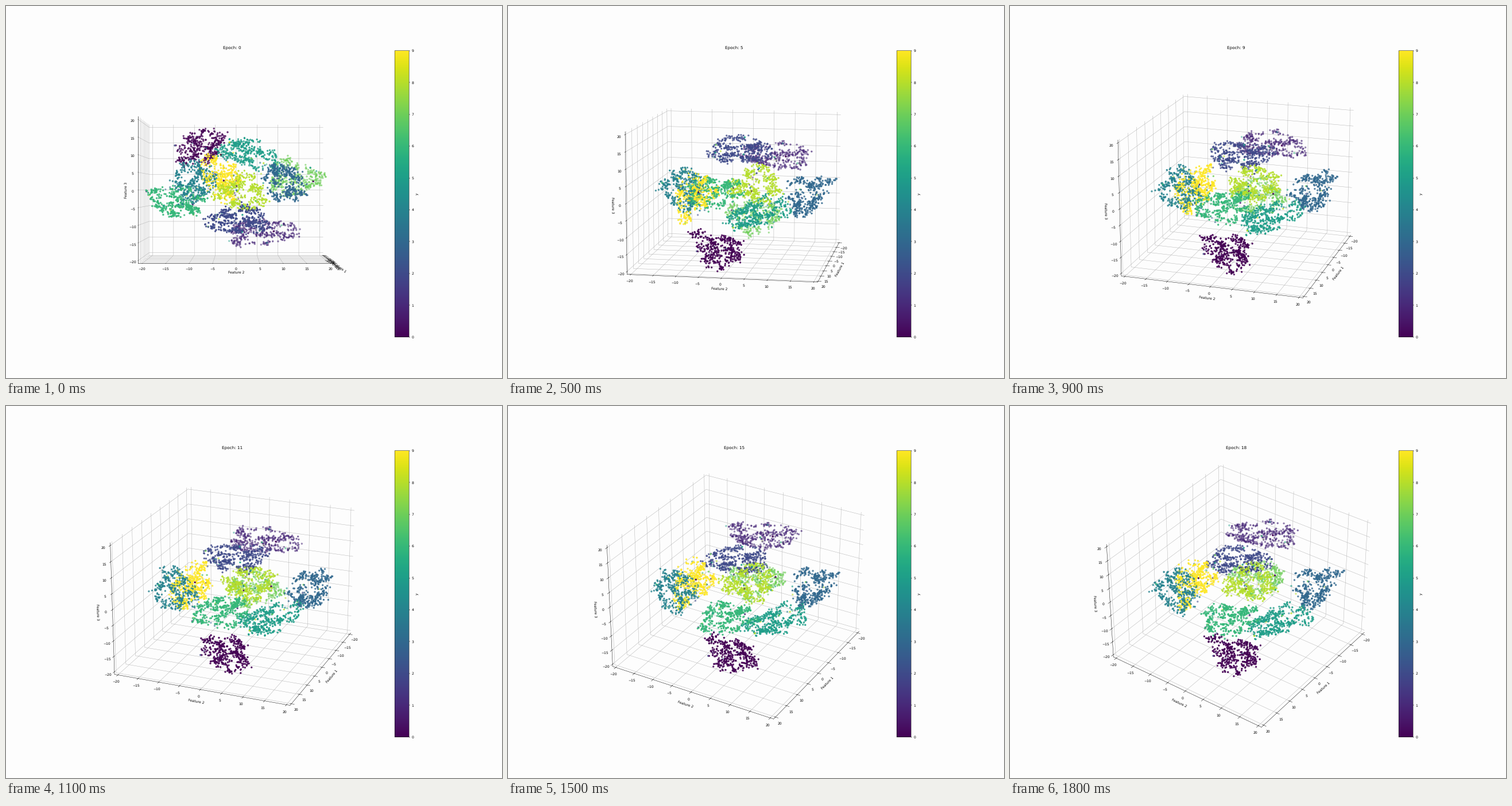
These frames come from a looping animation (864 px wide and 648 px high, 1900 ms). A matplotlib script:

```python
import numpy as np
import matplotlib.pyplot as plt
from matplotlib.animation import FuncAnimation
from matplotlib.cm import ScalarMappable
from matplotlib.colors import Normalize

# Unsnapped lines and unhinted text look as if scaled down smoothly
plt.rcParams.update({"path.snap": False, "text.hinting": "none"})

EPOCHS = 19
CLASSES = 10
PER_CLASS = 390
CLUMPS = 60
LIMIT = 20 * 25 / 24
PAPER = "#fdfdfd"

# Camera of the 3D axes: stage centre, focal length in pixels, distance
CENTRE = (401.0, 320.5)
FOCAL = 2697
DIST = 10
BOX_TO_DATA = np.array([35, 35, 46.67])

# Cluster centres on the stage: first epoch, around the flip, last epoch
START = np.array([(333, 247), (444, 395), (403, 374), (483, 308), (325, 307),
                  (426, 260), (298, 340), (502, 300), (408, 325), (372, 297)])
MIDDLE = np.array([(360, 424), (466, 260), (403, 250), (520, 328), (302, 318),
                   (438, 358), (358, 325), (430, 366), (430, 312), (324, 332)])
END = np.array([(385, 432), (440, 223), (398, 268), (530, 314), (288, 320),
                (472, 372), (383, 372), (432, 300), (417, 308), (320, 308)])
WIDTH = np.array([43, 58, 55, 41, 38, 52, 48, 44, 43, 36])
LEAN = np.array([.2, .1, 0, -.3, .2, -.2, -.1, 0, 0, -.4])
AREA = 1350
MIRROR_Y = 325
FAR_CLASSES = (1, 7)

rng = np.random.default_rng(7)
total = CLASSES * PER_CLASS
label = np.repeat(np.arange(CLASSES), PER_CLASS)
stray = rng.random(total) < 0.028
home = np.where(stray, rng.integers(0, CLASSES, total), label)

# Each cluster is a disc of small clumps
clump = rng.integers(0, CLUMPS, total) + CLUMPS * label
clump_radius = np.sqrt(rng.random(CLASSES * CLUMPS))[clump]
clump_angle = rng.uniform(0, 2 * np.pi, CLASSES * CLUMPS)[clump]
disc = clump_radius * np.exp(1j * clump_angle)
disc += rng.normal(0, 0.09, total) + 1j * rng.normal(0, 0.09, total)

thick = rng.uniform(-0.12, 0.12, total)
stray_depth = rng.uniform(-0.5, 0.35, total)


def view_angle(epoch):
    """Elevation and azimuth share one value in degrees."""
    return 2 * epoch


def unproject(px, py, depth, degrees):
    """Turn stage pixels and depth toward the viewer into data coordinates."""
    s, c = np.sin(np.radians(degrees)), np.cos(np.radians(degrees))
    right = np.array([-s, c, 0])
    up = np.array([-s * c, -s * s, c])
    toward = np.array([c * c, c * s, s])
    scale = (DIST - depth) / FOCAL
    u = (px - CENTRE[0]) * scale
    v = (CENTRE[1] - py) * scale
    pos = np.outer(u, right) + np.outer(v, up) + np.outer(depth, toward)
    return pos * BOX_TO_DATA


def mirror(centres):
    return np.column_stack([centres[:, 0], 2 * MIRROR_Y - centres[:, 1]])


def centres_at(epoch):
    """Drift before and after the embedding turns upside down."""
    if epoch < 4:
        t = min(epoch / 2, 1)
        return START + t * (mirror(MIDDLE) - START), -1
    s = np.clip((epoch - 5) / (EPOCHS - 6), 0, 1)
    t = 1 - (1 - s) ** 2
    return MIDDLE + t * (END - MIDDLE), 1


def points_at(epoch):
    centres, side = centres_at(epoch)
    x, y = centres[home].T
    width = WIDTH[home]
    outline = 1 + 0.12 * np.sin(3 * np.angle(disc) + 2 * home + epoch / 2)
    dx = width * disc.real * outline
    dy = AREA / width * disc.imag * outline + LEAN[home] * dx
    # Seen from above, whatever is lower on the stage is nearer.
    near = 0.2 + 0.001 * (y - MIRROR_Y)
    depth = np.where(np.isin(home, FAR_CLASSES), -0.15, near) + thick
    depth = np.where(stray, stray_depth, depth)
    return unproject(x + dx, y + side * dy, depth, view_angle(epoch))


fig = plt.figure(figsize=(20, 15), dpi=43.2, facecolor=PAPER)
ax = fig.add_subplot(projection="3d", facecolor=PAPER)
ax.set_xlabel("Feature 1")
ax.set_ylabel("Feature 2")
ax.set_zlabel("Feature 3")
bounds = (-LIMIT, LIMIT)
ax.set(xlim=bounds, ylim=bounds, zlim=bounds)
for axis in (ax.xaxis, ax.yaxis, ax.zaxis):
    axis.set_ticks(range(-20, 21, 5))
    axis.set_pane_color((1, 1, 1, 0))

scale = ScalarMappable(Normalize(0, CLASSES - 1), "viridis")
fig.colorbar(scale, ax=ax, label="y", ticks=range(CLASSES))

dots = None


def draw(epoch):
    global dots
    if dots is not None:
        dots.remove()
    dots = ax.scatter(*points_at(epoch).T, c=label, cmap="viridis",
                      vmin=0, vmax=CLASSES - 1)
    ax.view_init(elev=view_angle(epoch), azim=view_angle(epoch))
    ax.set_title(f"Epoch: {epoch}")
    return [dots]


anim = FuncAnimation(fig, draw, frames=EPOCHS, interval=100,
                     repeat=True, repeat_delay=0, blit=False)
plt.show()
```
